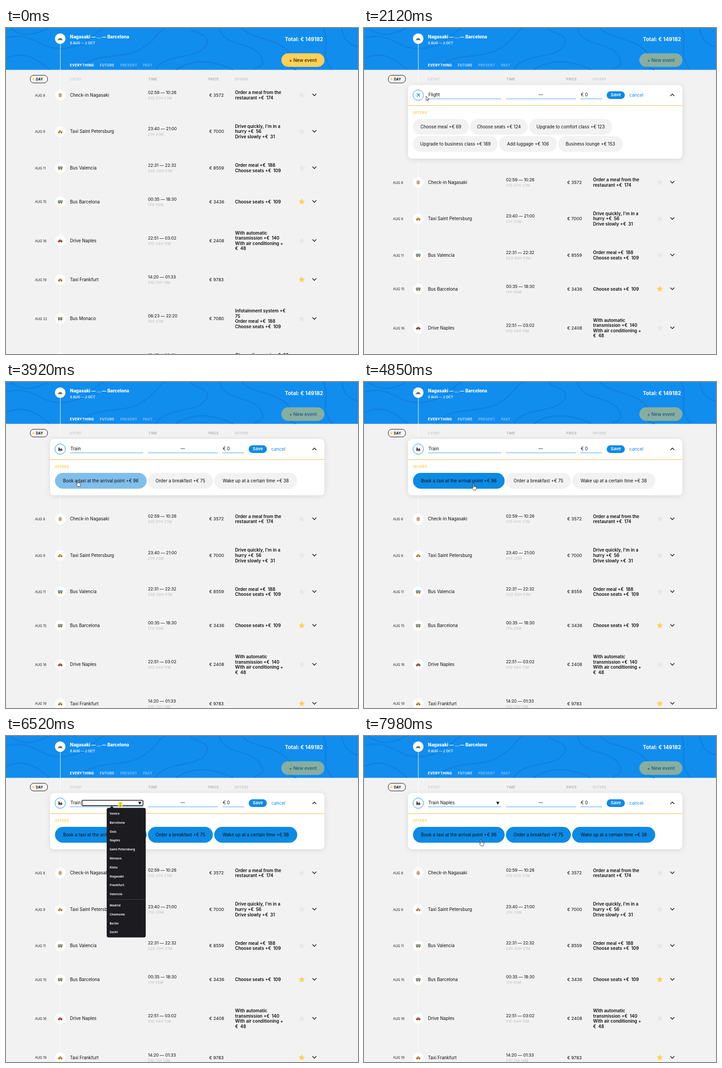
An HTML page for the animation above (8 s loop, 776 by 721 pixels).

```html
<!DOCTYPE html>
<html lang="en">
<head>
<meta charset="utf-8">
<title>Trip planner</title>
<style>
  html, body { margin: 0; width: 100%; height: 100%; overflow: hidden; background: #f2f2f2; }
  svg { display: block; font-family: Inter, sans-serif; }
  .menu { font-family: "Noto Sans", sans-serif; }
  .card { filter: drop-shadow(0 2px 6px rgba(0, 0, 0, .11)); }
</style>
</head>
<body>
<svg id="stage" width="776" height="721" viewBox="0 0 776 721"></svg>
<script>
const BLUE = '#0d8ae4', YELLOW = '#ffd054', INK = '#0d0d0d';

// ---- markup helpers (y is the vertical centre of the text) ----
const text = (x, y, size, str, { fill = INK, weight = 400, gap = 0, anchor = 'start', extra = '' } = {}) =>
  `<text x="${x}" y="${y + size * .36}" font-size="${size}" fill="${fill}" font-weight="${weight}"
    letter-spacing="${gap}" text-anchor="${anchor}" ${extra}>${str}</text>`;
const rect = (x, y, w, h, r, fill, extra = '') =>
  `<rect x="${x}" y="${y}" width="${w}" height="${h}" rx="${r}" fill="${fill}" ${extra}/>`;
const path = (d, fill, extra = '') => `<path d="${d}" fill="${fill}" ${extra}/>`;
const stroke = (d, color, width = 1) => path(d, 'none', `stroke="${color}" stroke-width="${width}"`);
const disc = (x, y, r, fill, extra = '') => `<circle cx="${x}" cy="${y}" r="${r}" fill="${fill}" ${extra}/>`;
const at = (x, y, body, extra = '') => `<g transform="translate(${x} ${y})" ${extra}>${body}</g>`;

// ---- small pictograms, centred on 0,0 ----
const wheels = disc(-2.5, 2.6, 1.2, '#333') + disc(2.5, 2.6, 1.2, '#333');
const car = color => path('M-5 2.6v-2.4l1.6-.7 1.4-2.1h4.2l1.6 2.3 1.4.8v2.1z', color)
  + path('M-2.6-.4l.9-1.4h3.2l1.2 1.4z', '#5d8fa8') + wheels;
const icons = {
  Taxi: car('#ea9a2d'),
  Drive: car('#c9452f'),
  Bus: rect(-5, -3.2, 10, 6, 1, '#e6973c') + rect(-5, -3.2, 10, 3.6, 1, '#5f93ad')
    + stroke('M-1.7-3v3M1.7-3v3', '#ddd', .6) + wheels,
  'Check-in': rect(-4, -3, 8, 7, .5, '#e3c48f') + rect(-2.4, -4.3, 4.8, 1.6, .4, '#d98a8a')
    + stroke('M-2.6-1.6h1.4M-.7-1.6h1.4M1.2-1.6h1.4M-2.6.6h1.4M1.2.6h1.4', '#6a7f95', 1.1)
    + rect(-.8, 1.6, 1.6, 2.4, 0, '#7a5a45'),
  Flight: `<g transform="rotate(45)">${path('M0-5.4q1 .6 1 2.4l4 2.8v1.2l-4-1.2-.3 2.8 1.3 1.1v.8l-2-.5-2 .5v-.8l1.3-1.1-.3-2.8-4 1.2v-1.2l4-2.8q0-1.8 1-2.4z', '#4f9bd0')}</g>`,
  Train: path('M-4 2v-5h3v2.5h3v-2h1.2v2h.8l1 2.5z', '#4a4447') + rect(-4.6, -3.6, 4, 1, .3, '#c0563e')
    + stroke('M-4.5 2h9', '#c0563e') + disc(-2.6, 3, 1.3, '#333') + disc(.5, 3.2, 1.1, '#333') + disc(3, 3.2, 1.1, '#333'),
  Ship: path('M-5 0h10l-1.6 3.4h-7z', '#486a8c') + rect(-2.5, -2.5, 5, 2.3, .3, '#ccc') + rect(0, -4, 1.4, 1.6, 0, '#c9452f'),
  Sightseeing: path('M-4.5 3.5v-1h9v1zM-4.5-1.5L0-4l4.5 2.5z', '#8c8f98') + stroke('M-3-1v3.5M0-1v3.5M3-1v3.5', '#8c8f98', 1.2),
  Restaurant: disc(0, 0, 3, '#ccc') + stroke('M-4.4-4v8M4.4-4v8', '#777'),
  Mountain: path('M-5.5 3.6l3.8-6.4 2 2.4 1.5-1.6 3.7 5.6z', '#786f66') + path('M-1.7-2.8l1.4 1.8-1.4.6-1.4-.6z', '#fff')
    + path('M-5.5 3.6q5-2.6 11 0z', '#5d9440'),
};
const badge = (y, name, extra = '') => disc(119.5, y, 11.5, '#fff', extra) + at(119.5, y, icons[name]);

// ---- page parts ----
const contours = ['M0 68C30 52 62 60 95 92', 'M0 22C60 5 75 52 130 45S190 12 215 0', 'M10 0C40 25 70 12 95 0',
  'M160 92C190 50 260 72 300 45S330 12 350 0', 'M330 92C350 55 420 70 440 40S400 12 410 0',
  'M375 92C420 62 470 78 500 92', 'M470 0C480 42 540 30 560 60S545 85 550 92',
  'M520 0C540 25 590 20 620 50S600 80 640 92', 'M700 0C715 40 690 60 720 92', 'M740 0C745 30 760 38 776 42'];
const caps = (x, y, str, fill, weight = 600, gap = .5) => text(x, y, 7.3, str, { fill, weight, gap });

const header = rect(0, 0, 776, 92.5, 0, '#118dee')
  + contours.map(d => stroke(d, '#0f82e0', 3)).join('')
  + stroke('M119.8 35V92.5', '#fff') + stroke('M119.8 92.5V721', '#fff')
  + badge(23.5, 'Mountain')
  + text(141, 20, 9.7, 'Nagasaki — ... — Barcelona', { fill: '#fff', weight: 800 })
  + caps(141, 33, '8 AUG — 2 OCT', '#d9edfd', 700, 0)
  + text(699, 24.5, 11.4, 'Total: € 149182', { fill: '#fff', weight: 700, anchor: 'end' })
  + caps(141, 82, 'EVERYTHING', '#fff', 800)
  + caps(207, 82, 'FUTURE', '#b8dcfa', 800) + caps(252, 82, 'PRESENT', '#6fb9f5', 800) + caps(302, 82, 'PAST', '#6fb9f5', 800)
  + `<g id="add">${rect(607, 56, 95, 30, 15, YELLOW)}${text(654.5, 71, 10.2, '+ New event', { weight: 500, anchor: 'middle', fill: '#222' })}</g>`
  + rect(53.5, 104.5, 38, 17, 7.5, '#f6f6f6', 'stroke="#111"')
  + disc(60.5, 113, 2.2, YELLOW) + caps(66, 113.5, 'DAY', INK, 700, .2)
  + caps(141, 113.5, 'EVENT', '#cbcbcb') + caps(314, 113.5, 'TIME', '#ababab')
  + caps(446, 113.5, 'PRICE', '#ababab') + caps(504, 113.5, 'OFFERS', '#c4c4c4');

const starPath = Array.from({ length: 10 }, (_, i) => {
  const a = i * Math.PI / 5, r = i % 2 ? 3.4 : 7.4;
  return (i ? 'L' : 'M') + (r * Math.sin(a)).toFixed(2) + ' ' + (-r * Math.cos(a)).toFixed(2);
}).join('') + 'z';

const trips = [
  [148.5, 8, 'Check-in', 'Nagasaki', '02:59 — 10:26', '01D 07H 27M', 3572, 0, 'Order a meal from the|restaurant +€  174'],
  [229, 9, 'Taxi', 'Saint Petersburg', '23:40 — 21:00', '21H 20M', 7000, 0, "Drive quickly, I'm in a|hurry +€  56|Drive slowly +€  31"],
  [309.5, 11, 'Bus', 'Valencia', '22:31 — 22:32', '02D 00H 01M', 8559, 0, 'Order meal +€  188|Choose seats +€  109'],
  [384.3, 15, 'Bus', 'Barcelona', '00:35 — 18:30', '17H 55M', 3436, 1, 'Choose seats +€  109'],
  [470.5, 16, 'Drive', 'Naples', '22:51 — 03:02', '01D 04H 11M', 2408, 0, 'With automatic|transmission +€  140|With air conditioning +|€  48'],
  [556.8, 19, 'Taxi', 'Frankfurt', '14:20 — 01:33', '01D 11H 13M', 9783, 1, ''],
  [643, 22, 'Bus', 'Monaco', '06:23 — 22:20', '15H 57M', 7080, 0, 'Infotainment system +€|75|Order meal +€  188|Choose seats +€  109'],
  [729.3, 23, 'Drive', 'Oslo', '15:47 — 00:01', '08H 14M', 5120, 0, 'Choose live music +€  66|Order meal +€  188'],
];
const tripRow = ([y, day, type, city, time, span, price, starred, offers]) => {
  const lines = offers.split('|');
  return text(64, y + .5, 7.3, 'AUG ' + day, { fill: '#222' })
    + badge(y, type) + text(141, y, 9.7, `${type} ${city}`)
    + text(313, y - 6, 9.4, time, { gap: -.12 }) + text(313, y + 6.7, 7.5, span, { fill: '#b9b9b9', gap: .5 })
    + text(448, y, 9.6, '€ ' + price)
    + lines.map((line, i) => text(505, y + (i - (lines.length - 1) / 2) * 11.6, 9.7,
        line.replace(/ /g, '\u00a0'), { weight: 600 })).join('')
    + at(652, y, path(starPath, starred ? YELLOW : '#e7e7e7'))
    + stroke(`M675.5 ${y - 3}l4.3 4.4 4.3-4.4`, INK, 1.4);
};

const chip = ([x, y, w, label], id) => rect(x, y, w, 35, 17.5, '#f2f2f2', id ? `id="${id}"` : '')
  + text(x + w / 2, y + 17.5, 9.7, label, { anchor: 'middle' });
const flightOffers = [
  [108, 201, 123, 'Choose meal +€ 69'], [234, 201, 127, 'Choose seats +€ 124'], [364, 201, 183, 'Upgrade to comfort class +€ 123'],
  [108, 239, 187, 'Upgrade to business class +€ 189'], [298, 239, 127, 'Add luggage +€ 106'], [428, 239, 142, 'Business lounge +€ 153'],
];
const trainOffers = [
  [108, 201, 202, 'Book a taxi at the arrival point +€ 96'], [313, 201, 143, 'Order a breakfast +€ 75'],
  [459, 201, 183, 'Wake up at a certain time +€ 38'],
];
const form = (type, height, chips) => rect(97, 126, 605, height, 9, '#fff', 'class="card"')
  + badge(148.5, type, `stroke="${BLUE}"`) + text(142, 148, 9.7, type)
  + stroke('M141 156.7H302.5M313 156.7H467M477 156.7H525', '#3a9fe8', 1)
  + text(389.7, 148, 9.7, '—', { anchor: 'middle' }) + text(478, 148, 9.7, '€ 0')
  + rect(535, 140, 40, 17, 8.5, BLUE) + text(555, 148, 9.6, 'Save', { fill: '#fff', weight: 600, anchor: 'middle' })
  + text(585, 148, 9.9, 'cancel', { fill: BLUE })
  + stroke('M675.5 150.5l4.3-4.4 4.3 4.4', INK, 1.4)
  + stroke('M97 171.5H702', '#f4cb7c', 1.4) + caps(108, 187.5, 'OFFERS', YELLOW, 700) + chips;

const types = ['Taxi', 'Bus', 'Train', 'Ship', 'Drive', 'Flight', 'Check-in', 'Sightseeing', 'Restaurant'];
const typeMenu = rect(108, 169, 90, 178, 8, '#fff', 'class="card"')
  + types.map((name, i) => at(121, 186 + i * 18, icons[name]) + text(133, 186 + i * 18, 9, name)).join('');

const cities = ['Venice', 'Barcelona', 'Oslo', 'Naples', 'Saint Petersburg', 'Monaco', 'Kioto', 'Nagasaki', 'Frankfurt',
  'Valencia', 'Madrid', 'Chamonix', 'Berlin', 'Sochi'];
const cityY = i => 171.5 + i * 19.8 + (i > 9 ? 5 : 0);
const cityMenu = rect(167.5, 142.3, 134.5, 11.8, 2, 'none', 'stroke="#14141c" stroke-width="1.6"')
  + path('M228 160l5.2-5.2 5.2 5.2z', '#1c1b20') + rect(222, 159, 86, 286.5, 4, '#1c1b20')
  + rect(223, 0, 84, 19, 2, '#3b3a42', 'id="hover"') + stroke('M222 361.6h86', '#45444a')
  + cities.map((c, i) => text(228.5, cityY(i), 6.7, c, { fill: '#ededf0', weight: 600 })).join('');

const outline = 'stroke="#111" stroke-width=".8" stroke-linejoin="round"';
const pointers = {
  arrow: path('M0 0v9l2-1.8 1.5 3.3 1.5-.7-1.5-3.2h2.8z', '#fff', outline),
  hand: path('M-1 .8q1-1.6 2 0v4.4l4.6 1.2q1.2.4 1 1.8l-.8 3.6-.9 2.4h-4.8q-2-2.6-3.8-5.4 .8-1.8 2.7.2z', '#fff', outline)
    + stroke('M1 5.2v2M2.8 5.8v1.6M4.6 6.2v1.4', '#111', .6),
  beam: stroke('M-2-4h1.6l.4.4.4-.4h1.6M0-3.6v7.2M-2 4h1.6l.4-.4.4.4h1.6', '#6b5c10', .8),
};
const layer = (id, body, extra = '') => `<g id="${id}" ${extra}>${body}</g>`;

const stage = document.getElementById('stage');
stage.innerHTML = header + layer('rows', trips.map(tripRow).join(''))
  + layer('flight', form('Flight', 163, flightOffers.map(o => chip(o)).join('')))
  + layer('train', form('Train', 124.5, trainOffers.map((o, i) => chip(o, 'offer' + i)).join('')))
  + layer('types', typeMenu)
  + layer('marker', path('M291.5 145.6h7l-3.5 6.4z', INK)) + layer('naples', text(168, 148, 9.7, 'Naples'))
  + layer('cities', cityMenu, 'class="menu"')
  + layer('cursor', disc(0, 0, 6, '#ffe92e', 'id="click" opacity=".85"')
      + Object.entries(pointers).map(([id, body]) => layer(id, body)).join(''));

// ---- timeline ----
const el = id => document.getElementById(id);
const show = (id, on) => { el(id).style.display = on ? '' : 'none'; };
const between = (t, a, b) => t >= a && t < b;
const ramp = (t, a, b) => { const k = Math.min(1, Math.max(0, (t - a) / (b - a))); return k * k * (3 - 2 * k); };

const route = [[490, 790, 118], [930, 655, 72], [1300, 655, 72], [1990, 140, 151], [2050, 140, 151], [2120, 137, 151],
  [2260, 122, 150], [2660, 122, 150], [3450, 150, 217], [3700, 150, 217], [3920, 158, 217], [4380, 206, 225],
  [4720, 206, 225], [5200, 400, 225], [5330, 400, 225], [5540, 446, 226], [5650, 495, 226], [5780, 520, 224],
  [5980, 520, 224], [6390, 252, 152], [6590, 252, 152], [7250, 246, 230], [7520, 246, 230], [7980, 258, 229]];
const clicks = [1190, 2260, 3580, 4450, 5470, 5900, 6520, 7450];
const handTimes = [[700, 1320], [2180, 6090], [7520, 8000]];
// per offer: pointer enters, then click, each with its duration
const offerTimes = [[3720, 200, 4450, 150], [4950, 200, 5470, 220], [5630, 200, 5900, 200]];

function cursorAt(t) {
  const i = route.findIndex(p => p[0] > t);
  if (i === 0) return route[0].slice(1);
  if (i < 0) return route[route.length - 1].slice(1);
  const [t0, x0, y0] = route[i - 1], [t1, x1, y1] = route[i], k = ramp(t, t0, t1);
  return [x0 + (x1 - x0) * k, y0 + (y1 - y0) * k];
}
const tint = k => `rgb(${[13, 138, 228].map(c => Math.round(242 + (c - 242) * k))})`;

function render(t) {
  const opened = t >= 1250, isTrain = t >= 3650;
  el('rows').setAttribute('transform', `translate(0 ${isTrain ? 154.5 : opened ? 193 : 0})`);
  el('add').setAttribute('opacity', opened ? .8 - .3 * ramp(t, 1250, 1450) : 1 - .2 * ramp(t, 720, 920));
  show('flight', opened && !isTrain);
  show('train', isTrain);
  show('types', between(t, 2320, 3650));
  show('marker', t >= 6340);
  show('cities', between(t, 6520, 7520));
  show('naples', t >= 7520);
  offerTimes.forEach(([enter, d1, click, d2], i) =>
    el('offer' + i).setAttribute('fill', tint(.5 * ramp(t, enter, enter + d1) + .5 * ramp(t, click, click + d2))));

  const [x, y] = cursorAt(t);
  const hovered = cities.findIndex((_, i) => Math.abs(y - cityY(i)) < 9.9);
  show('hover', hovered >= 0);
  if (hovered >= 0) el('hover').setAttribute('y', cityY(hovered) - 9.5);

  const kind = between(t, 6330, 6640) ? 'beam' : handTimes.some(([a, b]) => between(t, a, b)) ? 'hand' : 'arrow';
  Object.keys(pointers).forEach(name => show(name, name === kind));
  show('click', clicks.some(c => between(t, c, c + 130)));
  el('cursor').setAttribute('transform', `translate(${x} ${y})`);
}
function tick() {
  render(performance.now() % 8000);
  requestAnimationFrame(tick);
}
tick();
</script>
</body>
</html>
```
